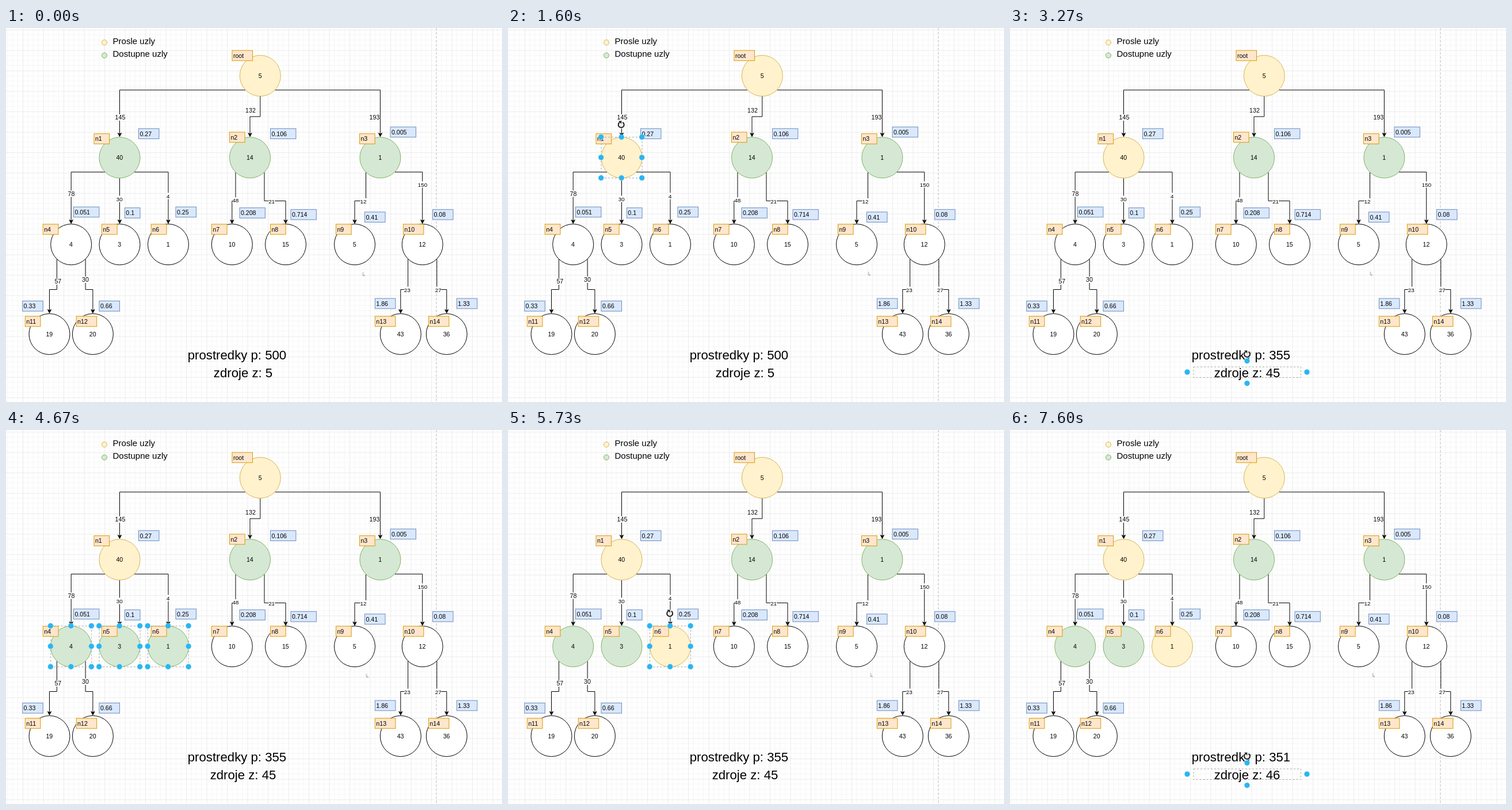
Recreate the animation shown at these times as an HTML page. Size 862 by 650 pixels, loop 8 s.

```html
<!DOCTYPE html>
<html lang="cs">
<head>
<meta charset="utf-8">
<title>Prosle a dostupne uzly</title>
<style>
html, body { margin: 0; width: 100%; height: 100%; overflow: hidden; background: #fff; }
svg { display: block; font-family: "Liberation Sans", Arial, sans-serif; font-size: 10.65px; }
text { fill: #000; }
.mid { text-anchor: middle; }
.big { font-size: 22.2px; text-anchor: middle; }
.legend { font-size: 15.05px; }
.node { fill: #fff; stroke: #000; stroke-width: 1; }
.passed { fill: #fff2cc; stroke: #d6b656; }
.open { fill: #d5e8d4; stroke: #82b366; }
.tag { fill: #ffe6cc; stroke: #d79b00; }
.value { fill: #dae8fc; stroke: #6c8ebf; }
.edge { fill: none; stroke: #000; }
.head { stroke: #000; stroke-width: .9; stroke-linejoin: miter; }
.frame { fill: none; stroke: #a8a8a8; stroke-dasharray: 3 3; }
.grip { fill: #29b6f2; stroke: #fff; stroke-opacity: .5; stroke-width: .6; }
.cursor { fill: none; stroke: #777; stroke-width: .8; }

.anim { animation: 8s step-end infinite; }
.hide { visibility: hidden; }
#n1 { animation-name: n1; }
#n4, #n5 { animation-name: n4; }
#n6 { animation-name: n6; }
#selN1 { animation-name: selN1; }
#selP1 { animation-name: selP1; }
#selZ1 { animation-name: selZ1; }
#selRow { animation-name: selRow; }
#selN6 { animation-name: selN6; }
#selP2 { animation-name: selP2; }
#selZ2 { animation-name: selZ2; }
#p500 { animation-name: p500; }
#p355 { animation-name: p355; }
#p351 { animation-name: selLate; }
#z5 { animation-name: z5; }
#z45 { animation-name: z45; }
#z46 { animation-name: selZ2; }
#cursor { animation-name: cursor; }

@keyframes n1 { 20% { fill: #fff2cc; stroke: #d6b656; } 100% { fill: #fff2cc; stroke: #d6b656; } }
@keyframes n4 { 58.375%, 100% { fill: #d5e8d4; stroke: #82b366; } }
@keyframes n6 {
  58.375% { fill: #d5e8d4; stroke: #82b366; }
  70.875%, 100% { fill: #fff2cc; stroke: #d6b656; }
}
@keyframes selN1 { 0%, 29.125%, 100% { visibility: hidden; } 20% { visibility: visible; } }
@keyframes selP1 { 0%, 40.875%, 100% { visibility: hidden; } 29.125% { visibility: visible; } }
@keyframes selZ1 { 0%, 58.375%, 100% { visibility: hidden; } 40.875% { visibility: visible; } }
@keyframes selRow { 0%, 70.875%, 100% { visibility: hidden; } 58.375% { visibility: visible; } }
@keyframes selN6 { 0%, 83.375%, 100% { visibility: hidden; } 70.875% { visibility: visible; } }
@keyframes selP2 { 0%, 95%, 100% { visibility: hidden; } 83.375% { visibility: visible; } }
@keyframes selZ2 { 0% { visibility: hidden; } 95%, 100% { visibility: visible; } }
@keyframes selLate { 0% { visibility: hidden; } 83.375%, 100% { visibility: visible; } }
@keyframes p500 { 0% { visibility: visible; } 29.125%, 100% { visibility: hidden; } }
@keyframes p355 { 0%, 83.375%, 100% { visibility: hidden; } 29.125% { visibility: visible; } }
@keyframes z5 { 0% { visibility: visible; } 40.875%, 100% { visibility: hidden; } }
@keyframes z45 { 0%, 95%, 100% { visibility: hidden; } 40.875% { visibility: visible; } }
@keyframes cursor {
  0% { transform: translate(620.5px, 428px); }
  .875% { transform: translate(622.5px, 428px); }
  2.125% { transform: translate(624.5px, 427.5px); }
  3.375% { transform: translate(626.5px, 427px); }
  70.875% { transform: translate(628px, 427px); }
  71.625%, 100% { transform: translate(630.5px, 426px); }
}
</style>
</head>
<body>
<svg id="stage" width="862" height="650" viewBox="0 0 862 650">
  <defs>
    <pattern id="grid" x="-6.4" y="3.1" width="35.5" height="35.5" patternUnits="userSpaceOnUse">
      <path d="M8.875 0V35.5M17.75 0V35.5M26.625 0V35.5M0 8.875H35.5M0 17.75H35.5M0 26.625H35.5" stroke="#f6f6f6"/>
      <path d="M.5 0V35.5M0 .5H35.5" stroke="#ebebeb"/>
    </pattern>
  </defs>
  <rect width="862" height="650" fill="url(#grid)"/>
  <path d="M748 0V650" stroke="#bdbdbd" stroke-dasharray="4 3"/>
</svg>
<script>
const R = 35.5, UNIT = 8.875;
const stage = document.getElementById('stage');

function add(name, attrs, parent = stage, text) {
  const el = document.createElementNS(stage.namespaceURI, name);
  for (const key in attrs) el.setAttribute(key, attrs[key]);
  if (text !== undefined) el.textContent = text;
  return parent.appendChild(el);
}

function label(x, y, text, cls, parent) {
  return add('text', { x, y, class: cls }, parent, text);
}

const nodes = {
  root: [441.8, 83, 5, 'passed'],
  n1: [197.5, 225.3, 40, 'open'], n2: [424, 225.3, 14, 'open'], n3: [650.4, 225.3, 1, 'open'],
  n4: [113.2, 376.2, 4], n5: [197.5, 376.2, 3], n6: [282, 376.2, 1], n7: [392.8, 376.2, 10],
  n8: [486, 376.2, 15], n9: [606, 376.2, 5], n10: [723.7, 376.2, 12],
  n11: [75.5, 532, 19], n12: [150.9, 532, 20], n13: [685.8, 532, 43], n14: [765.8, 532, 36]
};

// start of the path and the node it ends in
const edges = [
  ['M416 107.8H197.5', 'n1'], ['M441.8 118.5V154H424', 'n2'], ['M467.5 107.8H650.4', 'n3'],
  ['M172 250.3H113.2', 'n4'], ['M197.5 261', 'n5'], ['M223 250.3H282', 'n6'],
  ['M399 250.5V300.5H392.8', 'n7'], ['M449 250.5V300.5H486', 'n8'],
  ['M625.5 250.5V300.5H606', 'n9'], ['M675.5 250.3H723.7', 'n10'],
  ['M88.4 401.5V454.5H75.5', 'n11'], ['M138.2 401.5V454.5H150.9', 'n12'],
  ['M698.6 401.5V454.5H685.8', 'n13'], ['M748.8 401.5V454.5H765.8', 'n14']
];

// x, y of the centre, text, small type
const weights = [
  [198.5, 155.5, '145'], [425, 143, '132'], [640.5, 155.5, '193'], [113.4, 288, '78'],
  [197.3, 297, '30', 1], [281.6, 292, '4', 1], [399, 299.7, '48', 1], [461.6, 301.5, '21', 1],
  [621, 301.5, '12', 1], [724, 272, '150', 1], [90.3, 440.5, '57'], [138, 437.5, '30'],
  [697.2, 455, '23', 1], [751.2, 455, '27', 1]
];

// x, y, text, width in grid units
const tags = [
  [393, 39, 'root', 4], [153, 183.7, 'n1', 3], [388.5, 181, 'n2', 3], [614.5, 183.7, 'n3', 3],
  [64.3, 341, 'n4', 3], [166.5, 341, 'n5', 3], [252.4, 341, 'n6', 3], [357.5, 341, 'n7', 3],
  [459.5, 341, 'n8', 3], [573.5, 341, 'n9', 3], [690.4, 341, 'n10', 4], [33.3, 501, 'n11', 3],
  [122.2, 501, 'n12', 4], [641.4, 501, 'n13', 4], [734.4, 501, 'n14', 4]
];

const values = [
  [230.5, 174.8, '0.27'], [459.5, 174.8, '0.106'], [668, 172, '0.005'], [117.5, 311, '0.051'],
  [206.4, 312.5, '0.1'], [295, 311, '0.25'], [406, 312.5, '0.208'], [495, 315.4, '0.714'],
  [623.5, 319.8, '0.41'], [741.5, 315.4, '0.08'], [28.7, 474.4, '0.33'], [162, 474.4, '0.66'],
  [641.4, 470, '1.86'], [783.4, 470, '1.33']
];

function box(cls, x, y, text, units) {
  add('rect', { x, y, width: units * UNIT, height: 2 * UNIT, class: cls });
  label(x + 1.9, y + 12.7, text);
}

function dot(cy, cls, text) {
  add('circle', { cx: 171, cy, r: 4.6, class: 'node ' + cls });
  label(185.5, cy + 2.8, text, 'legend');
}

function grips(parent, points) {
  for (const [cx, cy] of points) add('circle', { cx, cy, r: 4.8, class: 'grip' }, parent);
}

function rotator(parent, x, y) {
  const g = add('g', { transform: `translate(${x} ${y})` }, parent);
  add('circle', { r: 7.2, fill: '#fff', 'fill-opacity': .75 }, g);
  add('path', { d: 'M2.6 -4.3A5 5 0 1 1 -2.6 -4.3', fill: '#eee', stroke: '#222', 'stroke-width': 2 }, g);
  add('path', { d: 'M-4.8 -6.6H.4V-1.6Z', fill: '#222' }, g);
}

function selection(id) {
  return add('g', { id, class: 'anim hide' });
}

function selectNode(g, key) {
  const [x, y] = nodes[key], points = [];
  add('rect', { x: x - R, y: y - R, width: 2 * R, height: 2 * R, class: 'frame' }, g);
  for (const i of [-1, 0, 1])
    for (const j of [-1, 0, 1])
      if (i || j) points.push([x - .3 + i * R, y - .3 + j * R]);
  grips(g, points);
}

function selectLine(id, x, y) {
  const g = selection(id);
  add('rect', { x: x - 93, y: y - 9, width: 186.5, height: 18.5, class: 'frame' }, g);
  grips(g, [[x - 104, y], [x + 104, y], [x, y - 19.5], [x, y + 19.5]]);
  rotator(g, x, y - 31);
}

function versions(prefix, x, y, name, list) {
  list.forEach((n, i) => {
    label(x, y, `${name}: ${n}`, 'big anim' + (i ? ' hide' : '')).id = prefix + n;
  });
}

dot(25.2, 'passed', 'Prosle uzly');
dot(47.6, 'open', 'Dostupne uzly');

for (const [start, end] of edges) {
  const [x, y] = nodes[end], tip = y - R - 1;
  add('path', { d: `${start}V${tip - 5}`, class: 'edge' });
  add('path', { d: `M${x} ${tip}l-3.1 -6.2l3.1 1.55l3.1 -1.55z`, class: 'head' });
}

for (const key in nodes) {
  const [cx, cy, text, cls = ''] = nodes[key];
  add('circle', { id: key, cx, cy, r: R, class: `node anim ${cls}` });
  label(cx - .2, cy + 4, text, 'mid');
}

for (const [x, y, text, small] of weights) {
  const size = small ? 9.76 : 10.65, w = text.length * size * .556;
  add('rect', { x: x - w / 2, y: y - 5.5, width: w, height: 11, fill: '#fff' });
  label(x, y + size * .36, text, 'mid').style.fontSize = size + 'px';
}

for (const [x, y, text, units] of tags) box('tag', x, y, text, units);
for (const [x, y, text] of values) box('value', x, y, text, text.length);

versions('p', 401.5, 576, 'prostredky p', [500, 355, 351]);
versions('z', 412, 607, 'zdroje z', [5, 45, 46]);

for (const key of ['n1', 'n6']) {
  const g = selection('selN' + key[1]), [x, y] = nodes[key];
  selectNode(g, key);
  rotator(g, x - .8, y - R - 21.7);
}
const row = selection('selRow');
for (const key of ['n4', 'n5', 'n6']) selectNode(row, key);
for (const i of [1, 2]) {
  selectLine('selP' + i, 401.2, 567.2);
  selectLine('selZ' + i, 412, 598);
}

add('path', { id: 'cursor', class: 'cursor anim', d: 'M0 -3.5V3M1.8 .8V3H3.2' });
</script>
</body>
</html>
```
